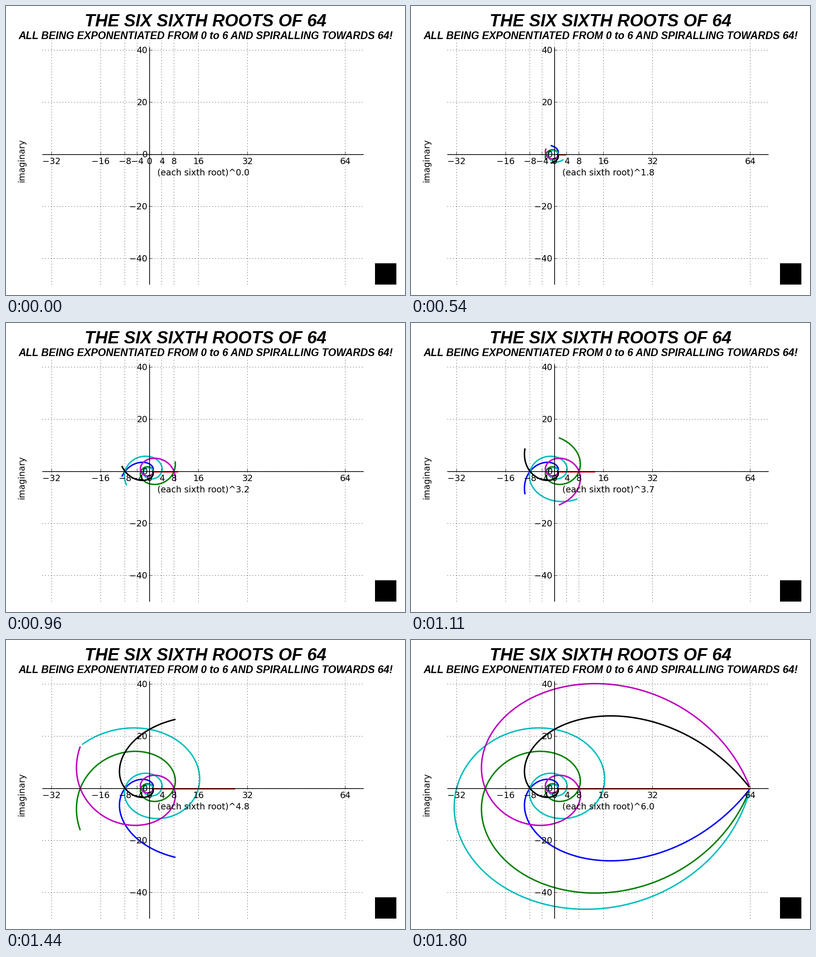
A matplotlib script that plays this animation: 878x638 px, repeating every 4.8 s.

```python
import numpy as np
import matplotlib.pyplot as plt
from matplotlib.animation import FuncAnimation
from matplotlib.patches import Rectangle

W, H, DPI = 878, 638, 72          # at 72 dpi one point is one pixel
PT = 114 / 72                     # pixels per plotted point
LEFT, RIGHT, TOP, BOTTOM = 80, 787, 76, 615
X0, Y0 = 315.8, 327.5             # origin of the plane on the stage
SX, SY = 6.733, 5.757             # pixels per unit
TICK = 4 * PT
LAST, FRAMES, STEP_MS = 60, 160, 30

plt.rcParams["font.family"] = "DejaVu Sans"
plt.rcParams["font.size"] = 12 * PT

fig = plt.figure(figsize=(W / DPI, H / DPI), dpi=DPI, facecolor="white")
ax = fig.add_axes([0, 0, 1, 1])
ax.set_xlim(0, W)
ax.set_ylim(H, 0)
ax.axis("off")


def px(x):
    return X0 + SX * x


def py(y):
    return Y0 - SY * y


def mid(v):
    """Centre of the pixel that holds v."""
    return np.floor(v) + 0.5


def rule(xs, ys, width, **style):
    ax.plot(xs, ys, color="black", lw=width * PT, zorder=3, snap=False, **style)


def label(x, y, text, ha="center", **style):
    return ax.text(x, y, text, ha=ha, va="baseline", zorder=4, **style)


def heading(y, text, size):
    label(W / 2, y, text, family="Liberation Sans", weight="bold",
          style="italic", size=size)


def number(v):
    return str(v).replace("-", "\u2212")


DOTS = dict(linestyle=(0, (2, 6)), dash_capstyle="butt")
SOLID = dict(solid_capstyle="butt")

for v in (-32, -16, -8, -4, 0, 4, 8, 16, 32, 64):
    x = mid(px(v))
    rule([x, x], [BOTTOM, TOP], 0.5, **DOTS)
    rule([x, x], [Y0, Y0 - TICK], 0.5, **SOLID)
    label(px(v), 349, number(v))

for v in (-40, -20, 0, 20, 40):
    y = mid(py(v))
    rule([LEFT, RIGHT], [y, y], 0.5, **DOTS)
    rule([X0, X0 + TICK], [y, y], 0.5, **SOLID)
    label(X0 - TICK + 2, py(v) + 6.5, number(v), ha="right")

# Two-pixel axes sit on a pixel edge
x, y = np.ceil(X0), np.ceil(Y0)
rule([LEFT, RIGHT], [y, y], 1, **SOLID)
rule([x, x], [91, BOTTOM], 1, **SOLID)

heading(45, "THE SIX SIXTH ROOTS OF 64", 38)
heading(73, "ALL BEING EXPONENTIATED FROM 0 to 6 AND SPIRALLING TOWARDS 64!", 22.9)
label(40, 341, "imaginary", rotation=90, rotation_mode="anchor")
power = label((LEFT + RIGHT) / 2 + 1, 374, "")
ax.add_patch(Rectangle((812, 568), 47, 47, fc="black", lw=0, zorder=4))

# Each root is 2 * exp(i * turn * pi / 3)
TURNS = {"b": 1, "g": 2, "r": 0, "c": 3, "m": -2, "k": -1}
curves = [(ax.plot([], [], color=c, lw=2 * PT, zorder=2)[0], turn)
          for c, turn in TURNS.items()]


def draw(i):
    n = min(i, LAST)
    t = np.arange(10 * n) / 100
    for line, turn in curves:
        z = 2 ** t * np.exp(1j * turn * np.pi / 3 * t)
        line.set_data(px(z.real), py(z.imag))
    power.set_text(f"(each sixth root)^{n / 10:.1f}")
    return [line for line, _ in curves] + [power]


anim = FuncAnimation(fig, draw, frames=FRAMES, interval=STEP_MS, repeat=True)
plt.show()
```
